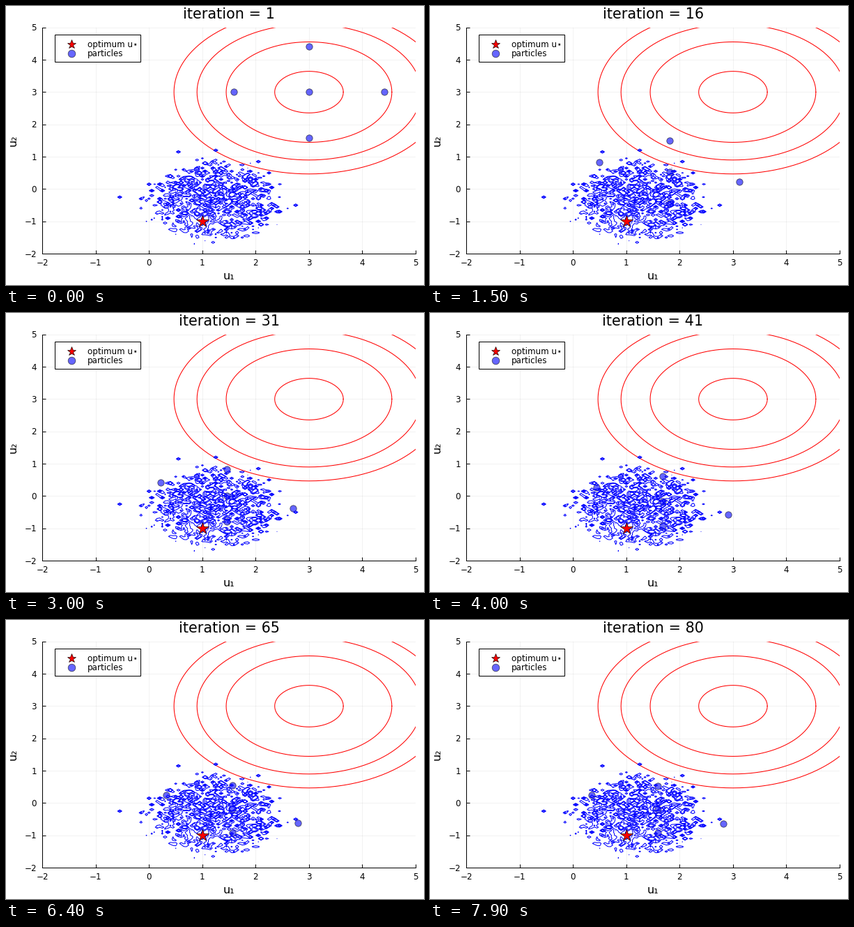
A matplotlib script for the animation above (8000 ms loop, 600x400 px).

```python
import numpy as np
import matplotlib.pyplot as plt
from matplotlib.animation import FuncAnimation

W, H, DPI = 600, 400, 100
FRAMES, INTERVAL = 80, 100
PT = 72 / DPI  # points per pixel
LEFT, RIGHT, TOP, BOTTOM = 52.3, 588, 30.8, 355.1
LO, HI = -2, 5

plt.rcParams["font.family"] = "DejaVu Sans"
fig = plt.figure(figsize=(W / DPI, H / DPI), dpi=DPI, facecolor="white")
ax = fig.add_axes([LEFT / W, 1 - BOTTOM / H, (RIGHT - LEFT) / W, (BOTTOM - TOP) / H])
hud = fig.add_axes([0, 0, 1, 1], zorder=3)
hud.set(xlim=(0, W), ylim=(H, 0))
hud.axis("off")


def px(x, y):
    s = HI - LO
    return LEFT + (x - LO) / s * (RIGHT - LEFT), TOP + (HI - y) / s * (BOTTOM - TOP)


def label(x, y, text, size, ha="center", **kw):
    kw.setdefault("va", "baseline")
    return hud.text(x, y, text, fontsize=size * PT, ha=ha, **kw)


def star(axes, x, y, size):
    axes.plot([x], [y], "*", ms=size * PT, mfc="red", mec="black",
              mew=0.45, zorder=4, snap=False)


def dots(axes, x, y, size):
    return axes.plot(x, y, "o", ms=size * PT, mfc=(0, 0, 1, 0.6), mec=(0, 0, 0, 0.6),
                     mew=0.6, zorder=1.6, snap=False)[0]


# --- axes, grid and labels ---
ticks = range(LO, HI + 1)
ax.set(xlim=(LO, HI), ylim=(LO, HI), xticks=ticks, yticks=ticks)
ax.set_axisbelow(True)
ax.grid(color="black", alpha=0.07, lw=0.5)
ax.tick_params(direction="in", length=5 * PT, width=0.72,
               labelbottom=False, labelleft=False)
for side, spine in ax.spines.items():
    spine.set_visible(side in ("left", "bottom"))
    spine.set_linewidth(0.72)

for v in ticks:
    name = str(v).replace("-", "\u2212")
    x, y = px(v, v)
    label(x, 372, name, 11.9)
    label(44, y + 4.4, name, 11.9, ha="right")
label(319.8, 391.5, "u\u2081", 16)
label(10.5, 193, "u\u2082", 16, rotation=90, va="center")
title = label(320, 18, "", 20.8)

# --- prior: rings of a unit Gaussian at log-spaced levels ---
a = np.linspace(0, 2 * np.pi, 241)
for n in range(4):
    r = np.sqrt(2 * (n + 0.207))
    ax.plot(3 + r * np.cos(a), 3 + r * np.sin(a), color="red", lw=0.75, zorder=2)

# --- posterior: contours of a rough, noisy bump ---
STEP = 0.05
grid = np.linspace(LO, HI, round((HI - LO) / STEP) + 1)
X, Y = np.meshgrid(grid, grid)
rng = np.random.default_rng(4)
radius = np.hypot((X - 1.22) / 1.25, (Y + 0.4) / 1.2)
rough = 0.8 + 1.1 * np.clip((Y + 1.5) / 1.5 + 0.3 * (X - 1), 0, 1)
field = np.exp(rough * (rng.standard_normal(X.shape) - 0.1 - 1.1 * radius**5))
field[radius > 1.25] = 0
for x, y in [(-0.55, -0.25), (0.55, 1.15), (1.25, 1.2), (2.05, 0.85), (2.75, -0.5)]:
    field[round((y - LO) / STEP), round((x - LO) / STEP)] = 5
ax.contour(X, Y, field, levels=[1, 2.5, 5], colors="blue", linewidths=0.75, zorder=2)

star(ax, 1, -1, 18)
cloud = dots(ax, [], [], 9.4)

# --- legend ---
hud.add_patch(plt.Rectangle((69.8, 41), 123.5, 39, fc="white", ec="black", lw=0.72))
star(hud, 93.5, 54.8, 13.5)
dots(hud, [93.5], [67.8], 10.6)
label(116.7, 58.8, "optimum u\u22c6", 11.9, ha="left")
label(116.7, 71.8, "particles", 11.9, ha="left")


# --- sigma points: the mean decays and wanders, the spread shrinks and tilts ---
def wave(k, peak, period):
    return np.cos(2 * np.pi * (k - peak) / period)


def sigma_points(k):
    wander = (1 - np.exp(-k / 9)) * (0.12 * wave(k, 39, 20.5) + 0.06 * wave(k, 36.5, 32))
    mx = 1.5 + 1.5 * np.exp(-k / 9) + wander
    my = -0.17 + 3.17 * np.exp(-k / 10) - 0.3 * wander
    w = 1.235 + 0.18 * np.exp(-(k / 16) ** 2)
    t = -0.44 * (1 - np.exp(-k / 13))
    h = 0.72 + 0.694 * np.exp(-k / 15)
    return mx + np.array([0, w, 0, -w, 0]), my + np.array([0, t, h, -t, -h])


def update(k):
    cloud.set_data(*sigma_points(k))
    title.set_text(f"iteration = {k + 1}")
    return cloud, title


anim = FuncAnimation(fig, update, frames=FRAMES, interval=INTERVAL,
                     repeat=True, repeat_delay=0, blit=False)
plt.show()
```
